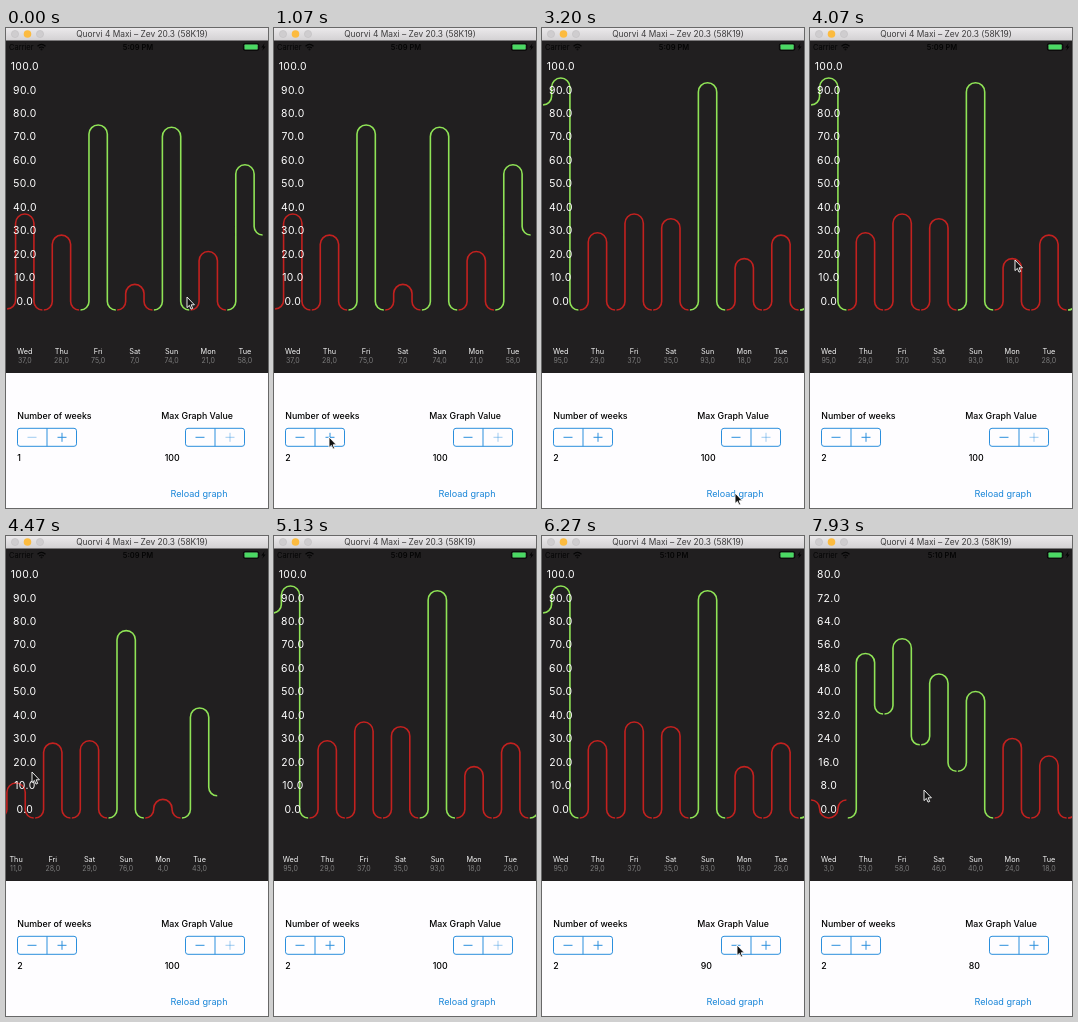
An HTML page that plays this animation: 262 by 480 pixels, repeating every 8000 ms.

```html
<!DOCTYPE html>
<html lang="en">
<head>
<meta charset="utf-8">
<style>
  html, body { margin: 0; height: 100%; overflow: hidden; background: #fff; }
  svg { display: block; width: 262px; height: 480px; font-family: Inter, Roboto, sans-serif; }
  .mid { text-anchor: middle; }
  .axis { font-size: 10.4px; letter-spacing: .4px; fill: #fff; }
  .day { font-size: 7.3px; fill: #f4f4f4; }
  .value { font-size: 7px; fill: #7c7c7c; }
  .form { font-size: 8.8px; font-weight: 500; fill: #000; }
  .reload { font-size: 9.1px; fill: #1a86d8; }
  .status { font-size: 7.5px; fill: #050505; }
  .line { fill: none; stroke-width: 1.6; }
  .stepper { fill: none; stroke: #2b8fdd; }
  .off { opacity: .45; }
</style>
</head>
<body>
<svg viewBox="0 0 262 480">
  <defs>
    <linearGradient id="bar" x2="0" y2="1">
      <stop stop-color="#ebe9eb"/><stop offset="1" stop-color="#d3d1d3"/>
    </linearGradient>
    <g id="stepper">
      <rect width="59" height="18" rx="2.5"/><path d="M29.5 0v18"/>
    </g>
  </defs>
  <rect width="262" height="480" fill="#fefdff"/>
  <rect y="12" width="262" height="333" fill="#211f20"/>
  <g id="days"></g>
  <g id="axis"></g>

  <rect width="262" height="12.5" fill="url(#bar)"/>
  <g fill="#cfcdcf" stroke="#bdbbbd" stroke-width=".5">
    <circle cx="9" cy="6" r="3.6"/>
    <circle cx="21.5" cy="6" r="3.8" fill="#fcbb3f" stroke="none"/>
    <circle cx="34" cy="6" r="3.6"/>
  </g>
  <text class="mid" x="136" y="9.2" font-size="8.4" fill="#3c3b3c">Quorvi 4 Maxi – Zev 20.3 (58K19)</text>

  <text class="status" x="3" y="21.8">Carrier</text>
  <g fill="none" stroke="#050505" stroke-width="1.2">
    <path d="M31.5 18.2q4-3.6 8 0M33.2 20q2.3-2 4.6 0"/>
    <circle cx="35.5" cy="21.4" r=".3"/>
    <rect x="237.4" y="15.6" width="15.4" height="6.8" rx="1.5" stroke-width=".8"/>
  </g>
  <rect x="238.5" y="16.5" width="13.2" height="5" rx=".8" fill="#4bd964"/>
  <path d="M258.5 15.2l-3.2 4.2h2l-1 3.4 3.3-4.3h-2z" fill="#050505"/>
  <text class="status mid" id="clock" x="132" y="21.8" font-weight="600"></text>

  <text class="form" x="11.3" y="391.2">Number of weeks</text>
  <text class="form" x="155.3" y="391.2">Max Graph Value</text>
  <g class="stepper" transform="translate(11.5 400.3)">
    <use href="#stepper"/><path d="M40 9h9m-4.5-4.5v9"/><path id="fewer" d="M10 9h9"/>
  </g>
  <g class="stepper" transform="translate(179.5 400.3)">
    <use href="#stepper"/><path d="M10 9h9"/><path id="higher" d="M40 9h9m-4.5-4.5v9"/>
  </g>
  <text class="form" id="weeks" x="11.3" y="433.3"></text>
  <text class="form" id="max" x="158.7" y="433.3"></text>
  <text class="reload mid" x="193" y="469">Reload graph</text>
  <path id="cursor" d="M0 0V10.6L2.4 8.4 4 12.1 5.7 11.4 4.1 7.8H7.4Z" fill="#111" stroke="#fff" stroke-width=".9"/>
</svg>
<script>
const LOOP = 8000, MOVE = 400;
const STEP = 36.7, R = STEP / 4, GAP = 0.7, TOP = 38.3, ZERO = 272.8, BASE = ZERO + R;
const NAMES = ['Wed', 'Thu', 'Fri', 'Sat', 'Sun', 'Mon', 'Tue'];
const $ = id => document.getElementById(id);

const graphs = [
  { from: 0, max: 100, values: [37, 28, 75, 7, 74, 21, 58] },
  { from: 2950, max: 100, values: [95, 29, 37, 35, 93, 18, 28, 62, 11, 28, 29, 76, 4, 43] },
  { from: 7400, max: 80, values: [3, 53, 58, 46, 40, 24, 18, 22] }
];

// Places the pointer goes to; each move takes MOVE ms and ends at `at`.
const stops = [
  { at: 0, x: 181, y: 269 },
  { at: 800, x: 55, y: 409 },
  { at: 2200, x: 198, y: 218 },
  { at: 2800, x: 193, y: 465 },
  { at: 3600, x: 205, y: 232 },
  { at: 4470, x: 26, y: 236 },
  { at: 5100, x: 275, y: 236 },
  { at: 6050, x: 195, y: 409 },
  { at: 7200, x: 193, y: 465 },
  { at: 7900, x: 114, y: 254 }
];

function ease(u) {
  u = Math.min(1, Math.max(0, u));
  return u * u * (3 - 2 * u);
}

function pointer(t) {
  return stops.reduce((p, { at, x, y }) => {
    const e = ease(1 + (t - at) / MOVE);
    return [p[0] + (x - p[0]) * e, p[1] + (y - p[1]) * e];
  }, [0, 0]);
}

// Fling past the right end, spring back to it, then fling home.
function scroll(t) {
  const end = 252, over = 51, decay = from => Math.exp((from - t) / 70);
  if (t < 4470) return (end + over) * ease((t - 4070) / MOVE);
  return t < 4800 ? end + over * decay(4470) : end * decay(4800);
}

// One day: half dip, rounded peak, half dip. d is 1 for a peak, -1 for a trough.
function dayPath(x, start, peak, end) {
  const d = start > peak ? 1 : -1, up = +(d > 0), q = R - GAP;
  const quarter = (px, py) => `A${q} ${q} 0 0 ${1 - up} ${px} ${py}`;
  return `M${x + GAP} ${start}${quarter(x + R, start - d * q)}V${peak + d * R}` +
    `A${R} ${R} 0 0 ${up} ${x + 3 * R} ${peak + d * R}V${end - d * q}${quarter(x + STEP - GAP, end)}`;
}

function drawGraph({ max, values }) {
  const label = (cls, x, y, s) => `<text class="${cls} mid" x="${x}" y="${y}">${s}</text>`;
  const peaks = values.map(v => ZERO - v * (ZERO - TOP) / max);
  // the line dips below the lower neighbour by half its headroom, down to the base
  const dip = (a, b = a) => {
    const low = Math.max(a, b);
    return Math.min(BASE, low + 21 + (low - TOP) / 2);
  };
  $('days').innerHTML = values.map((v, i) => {
    const x = 0.4 + i * STEP, mid = x + STEP / 2;
    let peak = peaks[i], start = dip(peak, peaks[i - 1]), end = dip(peak, peaks[i + 1]);
    // too low for two full arcs: the shape turns over
    if (BASE - peak < 2 * R) [start, peak, end] = [peak, BASE, peak];
    return `<path class="line" stroke="${v < 40 ? '#c3211f' : '#8fe356'}" d="${dayPath(x, start, peak, end)}"/>` +
      label('day', mid, 326.2, NAMES[i % 7]) + label('value', mid, 334.7, v + ',0');
  }).join('');
  $('axis').innerHTML = Array.from({ length: 11 }, (_, i) =>
    label('axis', 18.9, 42.1 + i * 23.45, (max * (10 - i) / 10).toFixed(1))).join('');
}

let shown;
function frame(now) {
  const t = now % LOOP;
  const graph = graphs.filter(g => g.from <= t).pop();
  if (graph !== shown) drawGraph(shown = graph);
  const weeks = t < 1070 ? 1 : 2, max = t < 6120 ? 100 : t < 6500 ? 90 : 80;
  $('weeks').textContent = weeks;
  $('max').textContent = max;
  $('fewer').classList.toggle('off', weeks === 1);
  $('higher').classList.toggle('off', max === 100);
  $('clock').textContent = t < 5700 ? '5:09 PM' : '5:10 PM';
  $('days').setAttribute('transform', `translate(${-scroll(t)} 0)`);
  $('cursor').setAttribute('transform', `translate(${pointer(t)})`);
  requestAnimationFrame(frame);
}
frame(performance.now());
</script>
</body>
</html>
```
